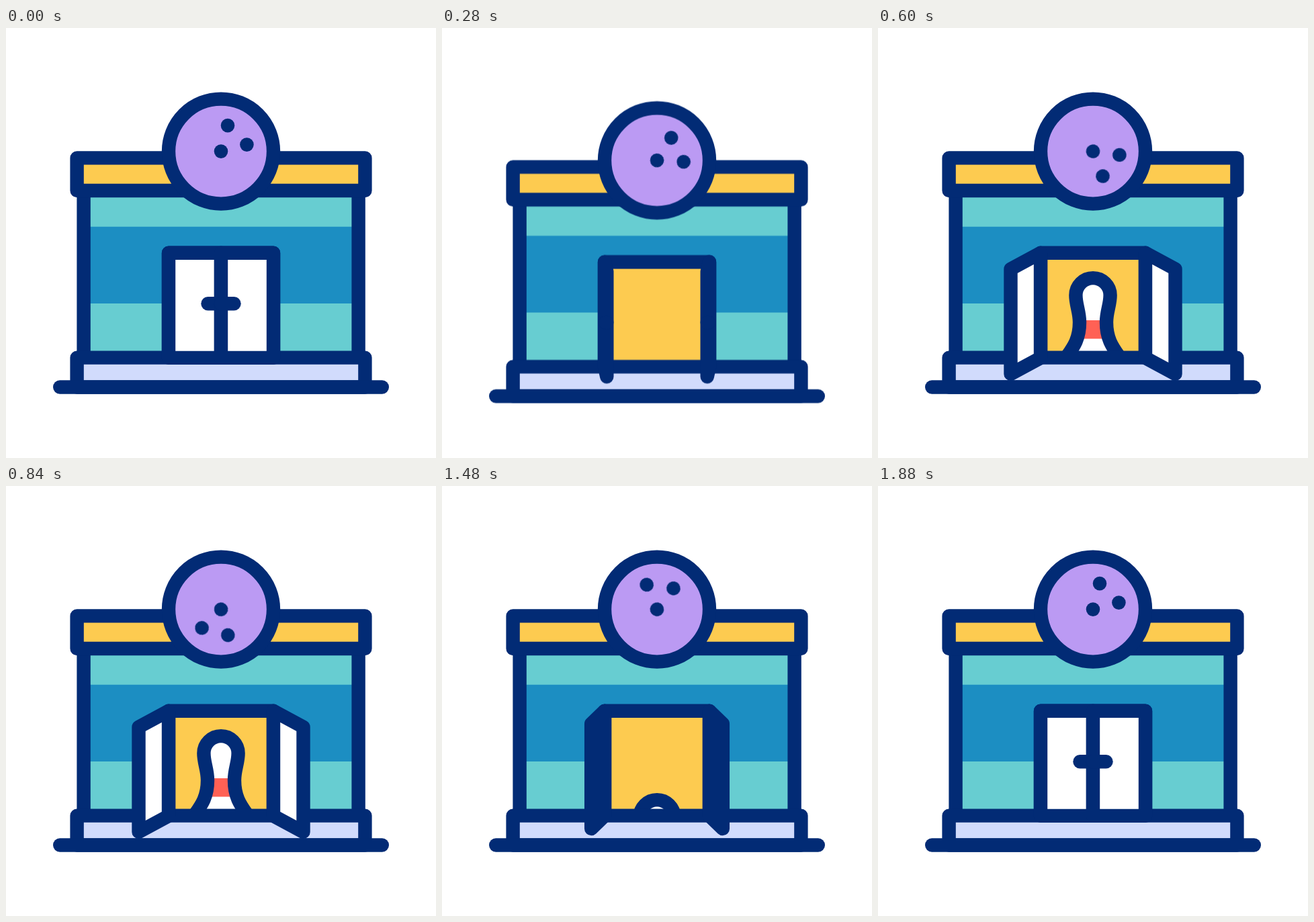
These frames come from a looping animation (640x640 px, 2000 ms). An HTML page:

```html
<!DOCTYPE html>
<html lang="en">
<head>
<meta charset="utf-8">
<title>Bowling alley</title>
<style>
  html, body { margin: 0; width: 100%; height: 100%; overflow: hidden; background: #fff; }
  svg { display: block; width: 100%; height: 100%; }

  .line, .leaf, .handle {
    stroke: #022b75;
    stroke-width: 20.4;
    stroke-linecap: round;
    stroke-linejoin: round;
  }
  .none { fill: none; }
  .navy { fill: #022b75; }
  .teal { fill: #67cdd1; }
  .blue { fill: #1c8ec2; }
  .gold { fill: #fdcb50; }
  .pale { fill: #d1dbfc; }
  .lilac { fill: #bb9af3; }
  .red { fill: #ff6155; }
  .white, .leaf { fill: #fff; }

  .hall, .holes, .pin, .leaf, .handle {
    animation: 2s cubic-bezier(.333, 0, .667, 1) infinite;
  }
  .hall { animation-name: hop; }
  .holes { animation-name: roll; transform-origin: 320px 183.6px; }
  .pin { animation-name: rise; }
  .leaf { animation-name: swing; }
  .handle { animation-name: follow; }

  @keyframes hop {
    0%, 2%, 30%, 100% { transform: translateY(0); }
    12% { transform: translateY(18.2px); }
    21.85% { transform: translateY(-24px); }
  }
  @keyframes roll {
    0%, 2% { transform: rotate(0deg); }
    92%, 100% { transform: rotate(360deg); }
  }
  @keyframes rise {
    0%, 14%, 78%, 100% { transform: translateY(145px); }
    24%, 68% { transform: translateY(0); }
  }
  @keyframes swing {
    0%, 2%, 89%, 100% { d: path("M242 334.7L320 334.7L320 490.9L242 490.9Z"); }
    23%, 68% { d: path("M242 334.7L197.5 358.7L197.5 514.9L242 490.9Z"); }
  }
  /* The handle is out of sight once its leaf has turned past edge-on. */
  @keyframes follow {
    0%, 2%, 89%, 100% { d: path("M300.5 410.2L320 410.2"); }
    23%, 68% { d: path("M207 434.2L197.5 434.2"); }
    0%, 14.2%, 76.6%, 100% { opacity: 1; }
    14.25%, 76.5% { opacity: 0; }
  }
</style>
</head>
<body>
<svg viewBox="0 0 640 640">
  <clipPath id="doorway"><path d="M242 334.7H398V490.6H242Z"/></clipPath>
  <g class="hall">
    <path class="teal" d="M115.6 242H524.6V490.6H115.6Z"/>
    <path class="blue" d="M115.6 295.8H524.6V410H115.6Z"/>
    <path class="line none" d="M115.6 242V490.6M524.6 242V490.6"/>

    <path class="gold" d="M242 334.7H398V490.6H242Z"/>
    <g clip-path="url(#doorway)">
      <g class="pin">
        <path id="body" class="white" d="M279 492C290 476 300 464 300 438C300 422 294.4 412 294.4 397.7A25.6 25.6 0 0 1 345.6 397.7C345.6 412 340 422 340 438C340 464 350 476 361 492Z"/>
        <path class="red" d="M299 435H341V462.5H299Z"/>
        <use href="#body" class="line" fill-opacity="0"/>
      </g>
    </g>

    <path class="line pale" d="M105.6 490.6H534.4V534.5H105.6Z"/>
    <path class="line none" d="M80.2 534.5H559.8"/>
    <path class="line gold" d="M105.6 193.4H534.4V242H105.6Z"/>

    <path class="line none" d="M242 490.6V334.7H398V490.6"/>
    <g>
      <path class="leaf" d="M242 334.7L320 334.7L320 490.9L242 490.9Z"/>
      <path class="handle" d="M300.5 410.2L320 410.2"/>
    </g>
    <g transform="matrix(-1 0 0 1 640 0)">
      <path class="leaf" d="M242 334.7L320 334.7L320 490.9L242 490.9Z"/>
      <path class="handle" d="M300.5 410.2L320 410.2"/>
    </g>

    <circle class="line lilac" cx="320" cy="183.6" r="78"/>
    <g class="holes navy">
      <circle cx="320" cy="183.6" r="10.3"/>
      <circle cx="330" cy="145.1" r="10.3"/>
      <circle cx="358.4" cy="173.6" r="10.3"/>
    </g>
  </g>
</svg>
</body>
</html>
```
